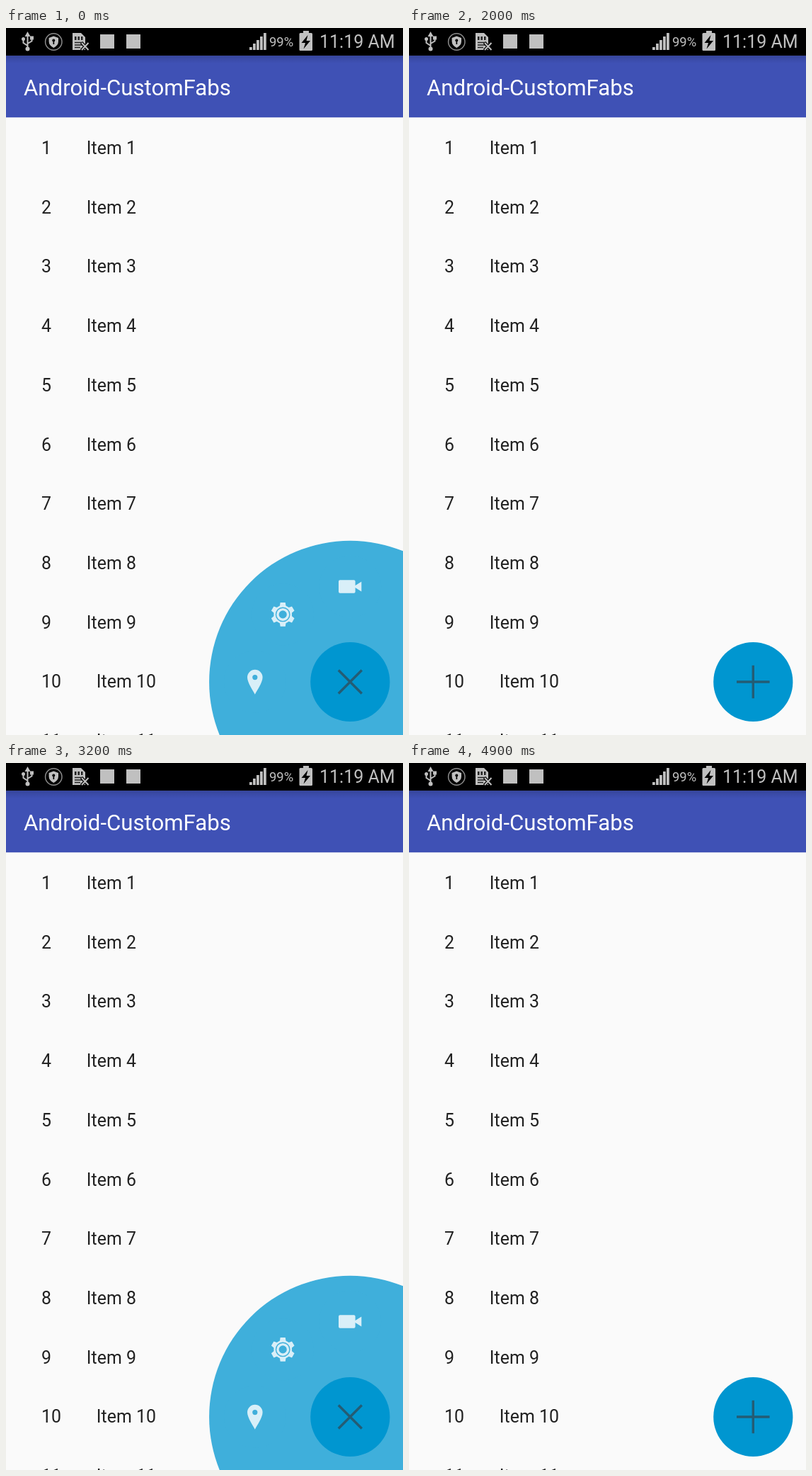
These frames come from a looping animation (561 px wide and 998 px high, 5000 ms). An HTML page with a canvas:

```html
<!DOCTYPE html>
<html lang="en">
<head>
<meta charset="utf-8">
<title>Circular menu</title>
<style>
html, body { margin: 0; width: 100%; height: 100%; overflow: hidden; background: #fafafa; }
canvas { display: block; width: 561px; height: 998px; }
</style>
</head>
<body>
<canvas id="stage" width="561" height="998"></canvas>
<script>
const ctx = document.getElementById('stage').getContext('2d');
const LOOP = 5000, STEP = 100;
const CENTER = { x: 486.3, y: 923 };
const PANEL_RADIUS = 199.2, ORBIT = 134.5, ITEM_RADIUS = 44, FAB_RADIUS = 56.1;
const BAR_TOP = 38.96, BAR_BOTTOM = 126.22;
const BLUE = '#0096d0', LIGHT_BLUE = '#3fafdb', GREY = '#c0c0c0';
const CLOSE_1 = 1400, OPEN = 2462, CLOSE_2 = 4385;

const clamp = v => Math.min(1, Math.max(0, v));
const ease = u => (1 - Math.cos(Math.PI * clamp(u))) / 2;
const overshoot = (u, tension = 0.9) => {
  const s = clamp(u) - 1;
  return s * s * ((tension + 1) * s + tension) + 1;
};

function openness(t, lag = 0) {
  if (t < OPEN) return 1 - ease((t - CLOSE_1) / 500);
  if (t < CLOSE_2) return overshoot((t - OPEN - lag) / 600);
  return 1 - ease((t - CLOSE_2) / 500);
}

function plusTurn(t) {
  if (t < OPEN || t >= CLOSE_2) return openness(t);
  return ease((t - OPEN) / 350);
}

const isPressed = t => (t >= 2400 && t < OPEN) || (t >= 4200 && t < 4300);

function disc(x, y, r, color) {
  ctx.fillStyle = color;
  ctx.beginPath();
  ctx.arc(x, y, r, 0, 2 * Math.PI);
  ctx.fill();
}

function box(x, y, w, h, color) {
  ctx.fillStyle = color;
  ctx.fillRect(x, y, w, h);
}

function roundBox(x, y, w, h, r, color) {
  ctx.fillStyle = color;
  ctx.beginPath();
  ctx.roundRect(x, y, w, h, r);
  ctx.fill();
}

function label(text, x, y, size, color) {
  ctx.font = `${size}px Roboto, sans-serif`;
  ctx.fillStyle = color;
  ctx.fillText(text, x, y);
  return ctx.measureText(text).width;
}

function shape(path, color) {
  ctx.fillStyle = color;
  ctx.fill(new Path2D(path), 'evenodd');
}

function outline(path, width, color) {
  ctx.strokeStyle = color;
  ctx.lineWidth = width;
  ctx.stroke(new Path2D(path));
}

// Menu icons, each centred on the origin at full size
function gearPath() {
  const path = new Path2D();
  for (let i = 0; i < 6; i++) {
    for (const [r, deg] of [[13, -19], [17.2, -12], [17.2, 12], [13, 19]]) {
      const a = (i * 60 - 90 + deg) * Math.PI / 180;
      path.lineTo(r * Math.cos(a), r * Math.sin(a));
    }
  }
  path.closePath();
  for (const r of [10.4, 9, 5.6]) {
    path.moveTo(r, 0);
    path.arc(0, 0, r, 0, 2 * Math.PI);
  }
  return path;
}

function cameraPath() {
  const path = new Path2D('M7.3 -1.5L16 -7V7L7.3 1.5Z');
  path.roundRect(-16.3, -9.3, 23.6, 18.6, 2);
  return path;
}

const pinPath = () => new Path2D('M0 17.8C-3 12 -10.8 1 -10.8 -6.4A10.8 10.8 0 0 1 10.8 -6.4C10.8 1 3 12 0 17.8Z' +
  'M3.6 -6.4A3.6 3.6 0 1 0 -3.6 -6.4A3.6 3.6 0 1 0 3.6 -6.4Z');

const ITEMS = [
  { icon: cameraPath(), angle: -90, lag: 22 },
  { icon: gearPath(), angle: -135, lag: 44 },
  { icon: pinPath(), angle: 180, lag: 66 }
];

function drawStatusBar() {
  box(0, 0, 561, BAR_TOP, '#000');

  // Cable
  outline('M30.5 10V29M30.5 25L24.5 21V16M30.5 22L36.5 18.5V14', 2, GREY);
  shape('M30.5 5L34.5 12H26.5Z', GREY);
  disc(30.5, 29.5, 3, GREY);
  disc(24.5, 15.5, 2.5, GREY);
  box(34, 11.5, 5, 5, GREY);

  // Shield
  outline('M79 19.5a11.7 11.7 0 1 1-23.4 0a11.7 11.7 0 1 1 23.4 0z', 1.5, '#8c8c8c');
  shape('M67.3 11.5L74 14V19Q74 24.5 67.3 28Q60.6 24.5 60.6 19V14Z', GREY);
  disc(67.3, 17.5, 2, '#000');
  box(66.5, 18, 1.7, 5, '#000');

  // Memory card with a cross
  shape('M94 7H106L112 13V31H94Z', GREY);
  for (const x of [97, 101.5, 106]) box(x, 12, 2.5, 5, '#222');
  outline('M97 20.5H108M97 24H108M97 27.5H105', 1.4, '#222');
  outline('M106.5 20.5L117 31.5M117 20.5L106.5 31.5', 4.5, '#000');
  outline('M107 21L116.5 31M116.5 21L107 31', 2, GREY);

  for (const x of [133, 170]) box(x, 9, 20, 20, GREY);

  // Signal
  for (let i = 0; i < 5; i++) {
    const height = 4 + i * 5;
    box(344 + i * 5, 31 - height, 3.8, height, GREY);
  }
  label('99%', 372, 26, 18.4, GREY);

  // Battery
  box(420, 4, 8, 4, GREY);
  roundBox(414.5, 7, 18.5, 25, 1.5, GREY);
  shape('M426.5 10L417.5 21H423L420.5 29.5L430 18H424.5Z', '#000');
  label('11:19 AM', 443, 27.5, 25, GREY);
}

function drawList() {
  for (let i = 1; i <= 11; i++) {
    const y = 178 + (i - 1) * 83.7;
    const width = label(String(i), 49.9, y, 24.9, '#212121');
    label('Item ' + i, 99.8 + width, y, 24.9, '#212121');
  }
}

function drawAppBar() {
  box(0, BAR_TOP, 561, BAR_BOTTOM - BAR_TOP, '#3f51b5');
  const shade = ctx.createLinearGradient(0, 39, 0, 50);
  shade.addColorStop(0, 'rgba(0,0,0,.14)');
  shade.addColorStop(1, 'rgba(0,0,0,0)');
  box(0, 39, 561, 11, shade);
  label('Android-CustomFabs', 25, 94.5, 31.2, '#fff');
}

function drawItem({ icon, angle, lag }, t) {
  const p = openness(t, lag);
  if (p <= 0) return;
  const a = angle * Math.PI / 180;
  ctx.save();
  ctx.globalAlpha = clamp(p);
  ctx.translate(CENTER.x + ORBIT * p * Math.cos(a), CENTER.y + ORBIT * p * Math.sin(a));
  ctx.rotate(4 * Math.PI * p);
  ctx.scale(p, p);
  disc(0, 0, ITEM_RADIUS, LIGHT_BLUE);
  ctx.fillStyle = 'rgba(255,255,255,.8)';
  ctx.fill(icon, 'evenodd');
  ctx.restore();
}

function drawMenu(t) {
  const p = openness(t);
  ctx.globalAlpha = 0.75 * clamp(p);
  disc(CENTER.x, CENTER.y, PANEL_RADIUS * p, BLUE);
  ctx.globalAlpha = 1;

  disc(CENTER.x, CENTER.y, FAB_RADIUS, isPressed(t) ? LIGHT_BLUE : BLUE);
  ctx.save();
  ctx.translate(CENTER.x, CENTER.y);
  ctx.rotate(plusTurn(t) * Math.PI / 4);
  // One path, so the translucent arms do not darken where they cross
  outline('M-23.3 0H23.3M0 -23.3V23.3', 3.4, 'rgba(55,65,72,.67)');
  ctx.restore();

  for (const item of ITEMS) drawItem(item, t);
}

function draw(now) {
  const t = Math.floor((now % LOOP) / STEP) * STEP;
  box(0, 0, 561, 998, '#fafafa');
  drawList();
  drawAppBar();
  drawStatusBar();
  drawMenu(t);
}

const start = performance.now();
function tick() {
  draw(performance.now() - start);
  requestAnimationFrame(tick);
}
tick();
</script>
</body>
</html>
```
